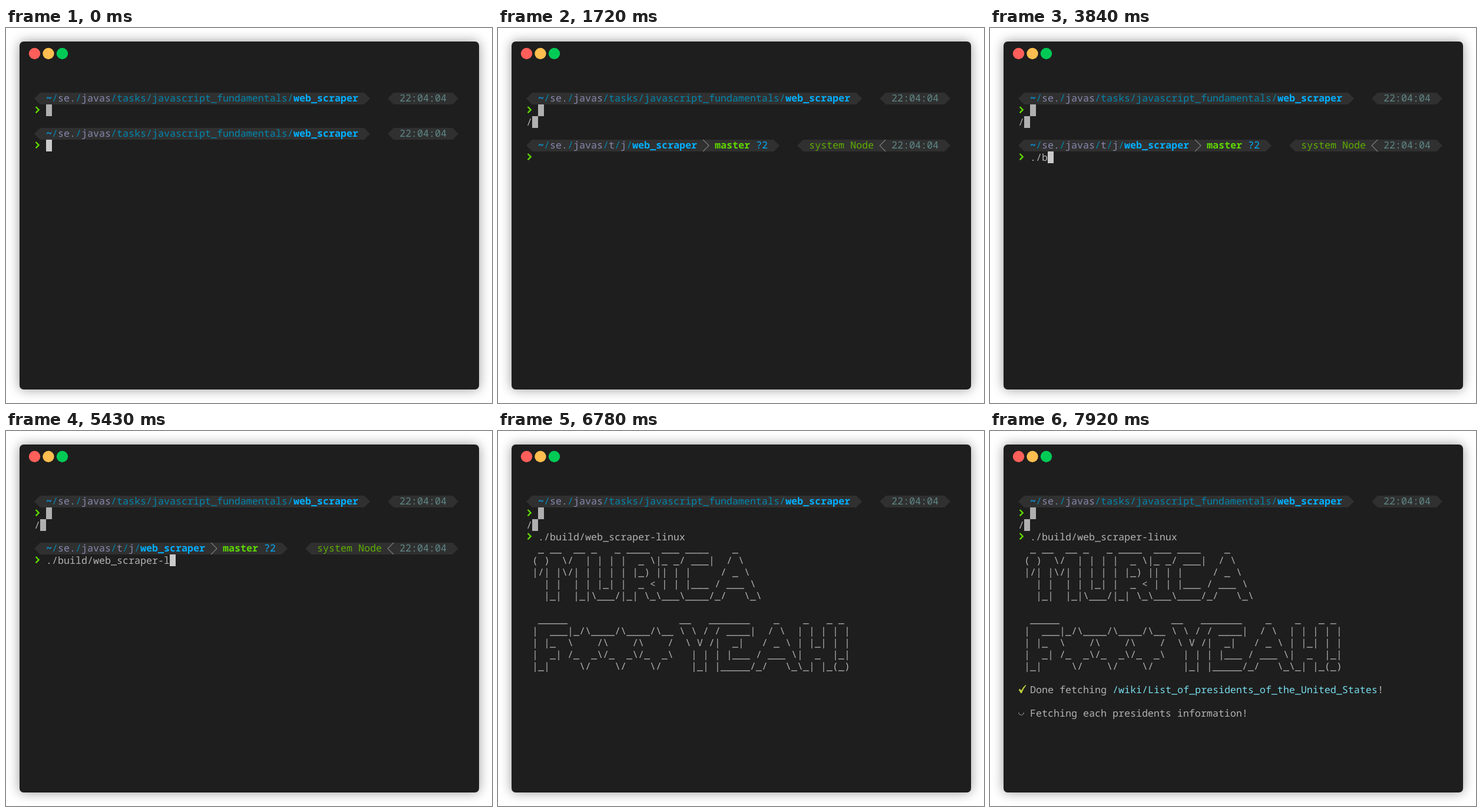
These frames come from a looping animation (825x638 px, 8 s). An HTML page:

```html
<!DOCTYPE html>
<html lang="en">
<head>
<meta charset="utf-8">
<title>Terminal</title>
<style>
  html, body { margin: 0; width: 100%; height: 100%; overflow: hidden; background: #fff; }
  svg { display: block; width: 825px; height: 638px; }
  text {
    font: 500 16.6667px "Noto Sans Mono", "DejaVu Sans Mono", monospace;
    font-variant-ligatures: none;
    text-rendering: geometricPrecision;
    white-space: pre;
  }
  .b { font-weight: 700; }
</style>
</head>
<body>
<svg viewBox="0 0 825 638">
  <defs>
    <filter id="blur" x="-10%" y="-10%" width="120%" height="120%">
      <feGaussianBlur stdDeviation="10"/>
    </filter>
  </defs>
  <rect width="825" height="638" fill="#fff"/>
  <rect x="23" y="23" width="780" height="592" rx="7" fill="#000" opacity=".4" filter="url(#blur)"/>
  <rect x="23" y="23" width="780" height="592" rx="7" fill="#1e1e1e"/>
  <circle cx="48.5" cy="43.5" r="9.7" fill="#ff5f5a"/>
  <circle cx="72" cy="43.5" r="9.7" fill="#ffbe4f"/>
  <circle cx="95.5" cy="43.5" r="9.7" fill="#00ca56"/>
  <g id="screen"></g>
</svg>
<script>
const LOOP = 8000, LEFT = 48, TOP = 110, CW = 10, CH = 20;
const GRAY = '#b2b2b2', BLUE = '#00afff', TEAL = '#0087af', LILAC = '#8787af',
  LIME = '#5fd700', GREEN = '#5faf00', CLOCK = '#5f8787', CYAN = '#78dcec',
  BAR = '#303030', CURSOR = '#cacaca', GHOST = '#b0b0b0';

const WIKI = '/wiki/List_of_presidents_of_the_United_States';
const BANNER = String.raw`
 _ __  __ _   _ ____  ___ ____    _
( )  \/  | | | |  _ \|_ _/ ___|  / \
|/| |\/| | | | | |_) || | |     / _ \
  | |  | | |_| |  _ < | | |___ / ___ \
  |_|  |_|\___/|_| \_\___\____/_/   \_\

 _____                   __   _______    _    _   _ _
|  ___|_/\____/\____/\__ \ \ / / ____|  / \  | | | | |
| |_  \    /\    /\    /  \ V /|  _|   / _ \ | |_| | |
|  _| /_  _\/_  _\/_  _\   | | | |___ / ___ \|  _  |_|
|_|     \/    \/    \/     |_| |_____/_/   \_\_| |_(_)`.split('\n').slice(1);

// [start, typed command, cursor shown]
const TYPING = [
  [0, '', 1], [1080, '.', 1], [1560, '.', 0], [1720, '', 0], [1780, './', 0],
  [1840, './', 1], [3840, './b', 1], [4210, './build/', 1],
  [4630, './build/web_scraper-', 1], [5430, './build/web_scraper-l', 1],
  [5620, './build/web_scraper-linux', 1]
];

const px = col => LEFT + col * CW;
const py = row => TOP + row * CH;
const esc = s => s.replace(/&/g, '&amp;').replace(/</g, '&lt;');

function text(col, row, str, fill = GRAY, bold = false, base = 16) {
  return `<text x="${px(col)}" y="${py(row) + base}" fill="${fill}"${bold ? ' class="b"' : ''}>${esc(str)}</text>`;
}

// Consecutive coloured runs: [string, colour, bold]
function runs(col, row, list, base) {
  let out = '';
  for (const [str, fill, bold] of list) {
    out += text(col, row, str, fill, bold, base);
    col += str.length;
  }
  return out;
}

const block = (col, row, fill = CURSOR) =>
  `<rect x="${px(col)}" y="${py(row)}" width="${CW}" height="${CH}" fill="${fill}"/>`;

const line = (d, stroke, width) =>
  `<path d="${d}" fill="none" stroke="${stroke}" stroke-width="${width}"/>`;

function bar(from, to, row) {
  const a = px(from), b = px(to), y = py(row);
  return `<path d="M${a} ${y + 10}l10 -10H${b - 10}l10 10l-10 10H${a + 10}z" fill="${BAR}"/>`;
}

const arrow = row => line(`M50.6 ${py(row) + 4}l5 5.2l-5 5.2`, LIME, 2.5);

function longPrompt(row) {
  return bar(0, 57, row) + bar(60, 72, row) + runs(2, row, [
    ['~', BLUE, true], ['/', TEAL], ['se.', LILAC], ['/', TEAL], ['javas', LILAC],
    ['/tasks/javascript_fundamentals/', TEAL], ['web_scraper', BLUE, true]
  ], 15) + text(62, row, '22:04:04', CLOCK, false, 15);
}

function gitPrompt(row) {
  const y = py(row);
  return bar(0, 43, row) + bar(46, 72, row) + runs(2, row, [
    ['~', BLUE, true], ['/', TEAL], ['se.', LILAC], ['/', TEAL], ['javas', LILAC],
    ['/', TEAL], ['t', LILAC], ['/', TEAL], ['j', LILAC], ['/', TEAL],
    ['web_scraper', BLUE, true], ['   ', BLUE], ['master', LIME, true], [' ?2', BLUE]
  ], 15)
    + line(`M${px(30)} ${y}l10 10l-10 10`, '#808080', 1.1)
    + text(48, row, 'system Node', GREEN, false, 15)
    + line(`M${px(61)} ${y}l-10 10l10 10`, '#808080', 1.1)
    + text(62, row, '22:04:04', CLOCK, false, 15);
}

function command(row, str, cursor) {
  return arrow(row) + text(2, row, str) + (cursor ? block(2 + str.length, row) : '');
}

// Arc spinner: quarter and half arcs going clockwise
function spinner(step, row) {
  const [from, to] = [[180, 270], [180, 360], [270, 360], [0, 90], [0, 180], [90, 180]][step % 6];
  const cx = 53, cy = py(row) + 9, r = 4.2;
  const at = deg => {
    const a = deg * Math.PI / 180;
    return `${(cx + r * Math.cos(a)).toFixed(2)} ${(cy + r * Math.sin(a)).toFixed(2)}`;
  };
  return line(`M${at(from)}A${r} ${r} 0 0 1 ${at(to)}`, '#a0a0a0', 1.1);
}

const check = row =>
  `<path transform="translate(48 ${py(row)})" d="M0.5 10.2L3 8.6L5 11.4Q8 5.5 12 2.2L13.6 2.4Q8.6 8.4 5.8 16H4Q2.6 12.6 .5 10.2z" fill="#bfd03c"/>`;

function typing(t) {
  const [, str, cursor] = TYPING.filter(s => s[0] <= t).pop();
  if (t < 1660) return longPrompt(3) + command(4, str, cursor);
  const echo = text(0, 2, '/') + block(1, 2, GHOST);
  return t < 1720 ? echo : echo + gitPrompt(4) + command(5, str, cursor);
}

function output(t) {
  let out = text(0, 2, '/') + block(1, 2, GHOST) + command(3, './build/web_scraper-linux', false);
  if (t < 6780) return out + block(0, 4);
  BANNER.forEach((s, i) => { out += text(1, 4 + i, s); });
  if (t < 6880) return out;
  if (t < 7520) {
    const step = Math.min(2, Math.floor((t - 6880) / 100));
    return out + spinner(step, 16) + runs(2, 16, [['Feching presidents from ', GRAY], [WIKI, CYAN]]);
  }
  return out + check(16)
    + runs(2, 16, [['Done fetching ', GRAY], [WIKI, CYAN], ['!', GRAY]])
    + spinner(Math.floor((t - 7520) / 100), 18)
    + text(2, 18, 'Fetching each presidents information!');
}

const screen = document.getElementById('screen');
let shown = '';

function draw(t) {
  const next = longPrompt(0) + arrow(1) + block(2, 1, GHOST) + (t < 5920 ? typing(t) : output(t));
  if (next !== shown) screen.innerHTML = shown = next;
}

function tick() {
  draw(performance.now() % LOOP);
  requestAnimationFrame(tick);
}
tick();
</script>
</body>
</html>
```
